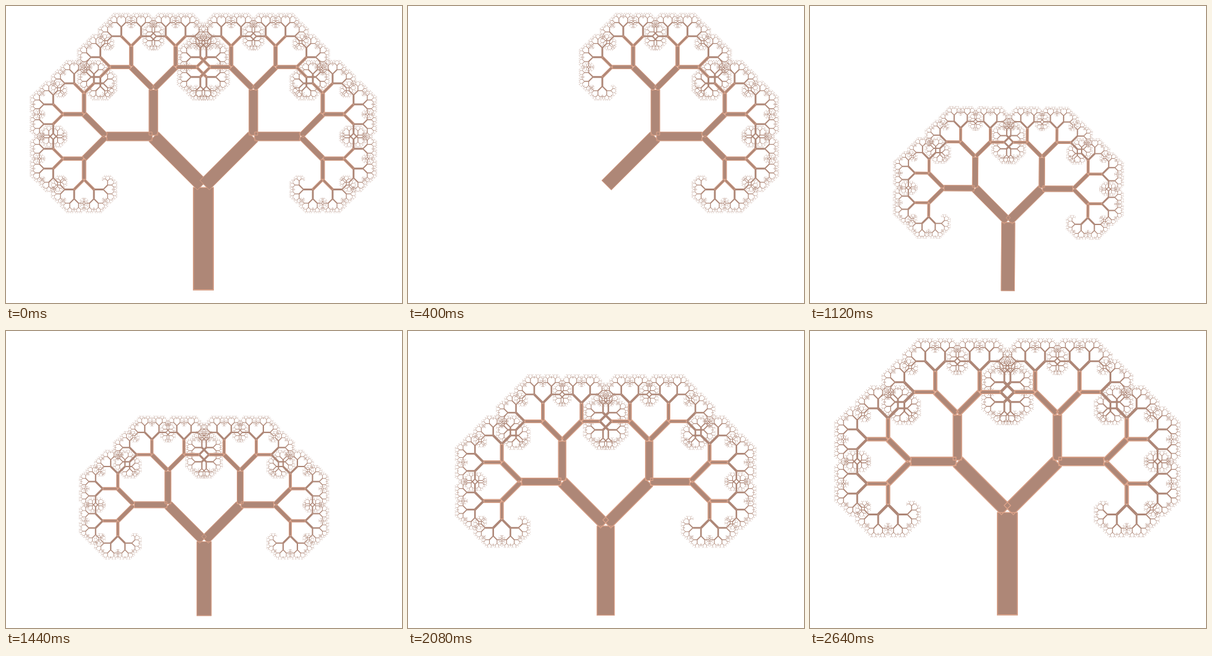
Write an HTML page with a canvas that moves like this. It is 640x480 px and loops after 2720 ms.

```html
<!DOCTYPE html>
<html lang="en">
<head>
<meta charset="utf-8">
<title>Self-similar tree</title>
<style>
  html, body { margin: 0; width: 100%; height: 100%; overflow: hidden; background: #fff; }
  canvas { display: block; width: 640px; height: 480px; }
</style>
</head>
<body>
<canvas id="stage" width="640" height="480"></canvas>
<script>
const ctx = document.getElementById('stage').getContext('2d');

const RATIO = 2 / 3, SPREAD = Math.PI / 4, DEPTH = 12, RIM_LEVELS = 5;
const LENGTH = 171.4, GROUND = 463, CENTER = 319;
const FORK = GROUND - LENGTH;
const WIDTH = 0.196, GAP_START = 0.021, GAP_END = 0.006, RIM = 1.3;
const STEP = 80, STEPS = 34;
const BARK_COLOR = '#ae8777', RIM_COLOR = '#dfa388';

// Adds a branch as a rectangle, inset on all sides.
function addBranch(path, x, y, len, angle, inset) {
  const ux = Math.sin(angle), uy = -Math.cos(angle);
  const a = len * GAP_START + inset, b = len * (1 - GAP_END) - inset;
  const h = len * WIDTH / 2 - inset;
  const at = (u, v) => [x + ux * u - uy * v, y + uy * u + ux * v];
  path.moveTo(...at(a, -h));
  path.lineTo(...at(b, -h));
  path.lineTo(...at(b, h));
  path.lineTo(...at(a, h));
  path.closePath();
}

function grow(tree, x, y, len, angle, level, depth) {
  addBranch(tree.bark, x, y, len, angle, 0);
  if (level < RIM_LEVELS) addBranch(tree.rim, x, y, len, angle, RIM / 2);
  if (level === depth) return;
  const ex = x + Math.sin(angle) * len, ey = y - Math.cos(angle) * len;
  for (const side of [-1, 1]) {
    grow(tree, ex, ey, len * RATIO, angle + side * SPREAD, level + 1, depth);
  }
}

function makeTree(depth) {
  const tree = { bark: new Path2D(), rim: new Path2D() };
  grow(tree, 0, 0, LENGTH, 0, 0, depth);
  return tree;
}

const trunk = makeTree(0), crown = makeTree(DEPTH);

function drawTree(tree, x, y, scale, angle) {
  ctx.save();
  ctx.translate(x, y);
  ctx.rotate(angle);
  ctx.scale(scale, scale);
  ctx.fillStyle = BARK_COLOR;
  ctx.fill(tree.bark);
  ctx.strokeStyle = RIM_COLOR;
  ctx.lineWidth = RIM;
  ctx.stroke(tree.rim);
  ctx.restore();
}

const mix = (a, b, p) => a + (b - a) * p;

function draw(k) {
  ctx.clearRect(0, 0, 640, 480);
  if (k < 15) {
    // The trunk and left half fade, then the right half takes the trunk's place.
    const fade = Math.max(0, 1 - k / 5);
    if (fade) {
      ctx.globalAlpha = fade;
      drawTree(trunk, CENTER, GROUND, 1, 0);
      drawTree(crown, CENTER, FORK, RATIO, -SPREAD);
      ctx.globalAlpha = 1;
    }
    const p = Math.max(0, (k - 7) / 7);
    drawTree(crown, mix(CENTER, 319.7, p), mix(FORK, GROUND, p), RATIO, mix(SPREAD, 0.006, p));
  } else {
    const p = (k - 15) / 18;
    drawTree(crown, mix(320.3, CENTER, p), GROUND, mix(RATIO, 1, p), 0);
  }
}

const start = performance.now();
let shown = -1;

function tick() {
  const k = Math.floor((performance.now() - start) / STEP) % STEPS;
  if (k !== shown) draw(shown = k);
  requestAnimationFrame(tick);
}
tick();
</script>
</body>
</html>
```
